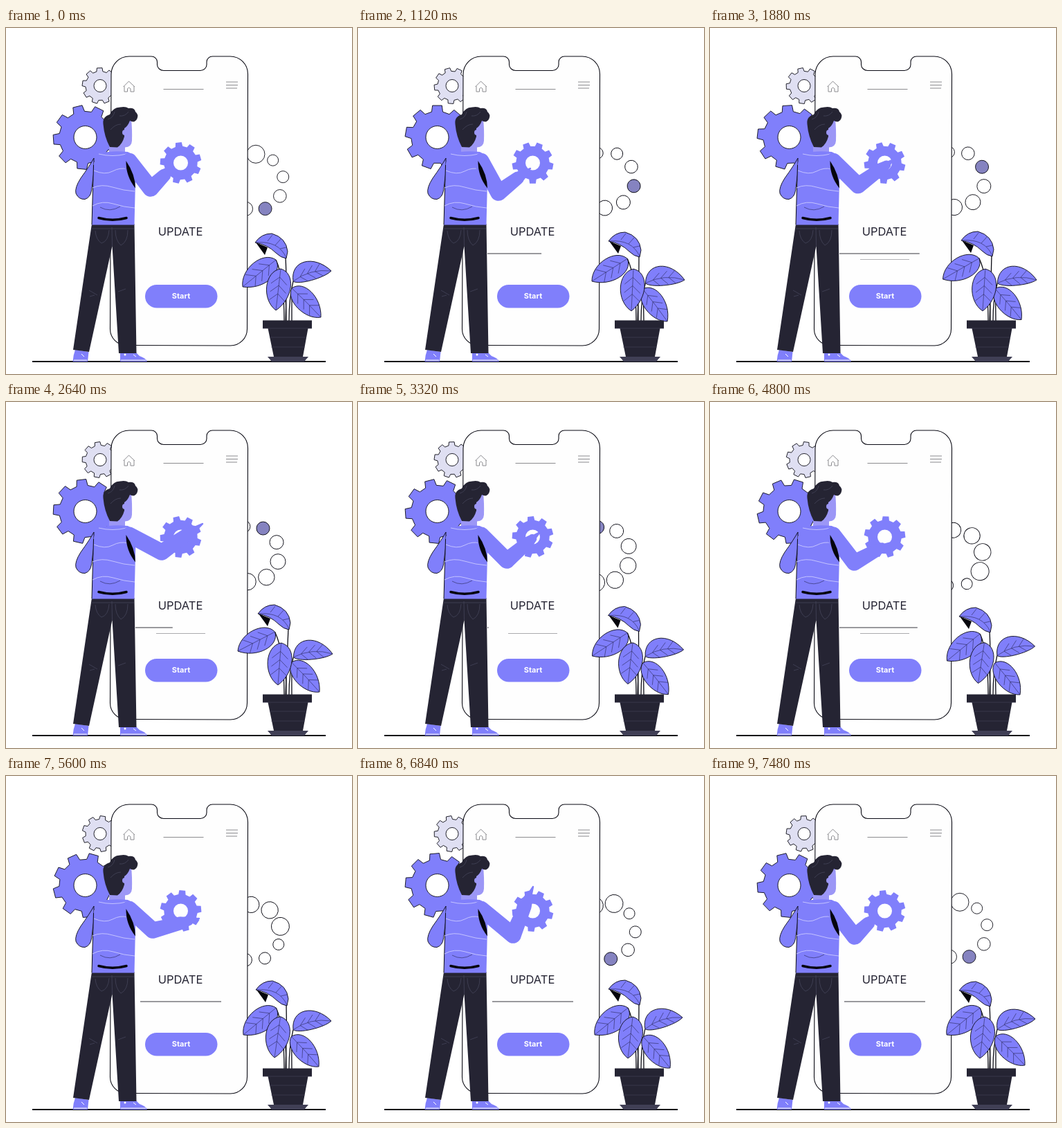
Recreate the animation shown at these times as an HTML page. Size 500x500 px, loop 7720 ms.

```html
<!DOCTYPE html>
<html lang="en">
<head>
<meta charset="utf-8">
<title>Update</title>
<style>
  html, body { margin: 0; width: 100%; height: 100%; overflow: hidden; background: #fff; }
  svg { display: block; width: 100vw; height: 100vh; }
  .main { fill: #807ffb; }
  .dark { fill: #252433; }
  .edge { stroke: #0b0b14; stroke-width: .9; stroke-linejoin: round; }
  .thin { fill: none; stroke: #8b8b8f; stroke-width: 1; }
  .wave { fill: none; stroke: #c4c3ff; stroke-width: 1; }
  .seam { fill: none; stroke: #45445a; stroke-width: .8; }
  .vein { fill: none; stroke: #35346f; stroke-width: .7; }
  .stem { fill: none; stroke: #0b0b14; stroke-width: 1.3; }
  text { font-family: Inter, "Open Sans", sans-serif; text-anchor: middle; }
</style>
</head>
<body>
<svg viewBox="0 0 500 500">
  <g id="ring"></g>
  <path id="gearSmall" class="edge" fill="#dfdff2" fill-rule="evenodd"/>
  <path id="gearBig" class="main edge" fill-rule="evenodd"/>

  <!-- phone -->
  <path fill="#fefefe" stroke="#0b0b14" stroke-width="1.1" d="M178 41H210A8.500 8 0 0 1 218.500 49V53A9.500 8.500 0 0 0 228 61.500H281A9.500 8.500 0 0 0 290 53V49A8.500 8 0 0 1 298.500 41H324A25.500 25.500 0 0 1 349.500 66.500L348.500 435A24 24 0 0 1 324.500 459L174 458.500A23.500 23.500 0 0 1 150.500 435L152 67A26 26 0 0 1 178 41Z"/>
  <path class="thin" d="M169.500 85L177.500 77L186 85M171 84V92H175.500V88Q177.500 84.500 180 88V92H185V84M227.500 88.500H285.500M318 78H335M318 82.500H335M318 87H334"/>
  <text x="252" y="300" font-size="16.5" fill="#252433">UPDATE</text>
  <path id="lineA" class="thin" style="stroke:#77777c;stroke-width:1.3"/>
  <path id="lineB" class="thin" d="M217 334.500H288" style="stroke:#aaaaae"/>
  <rect class="main" x="201" y="371" width="104.500" height="33.500" rx="16.750"/>
  <text x="253" y="391" font-size="11" font-weight="700" fill="#fff">Start</text>

  <path d="M38 482H462" stroke="#0b0b14" stroke-width="2"/>

  <!-- plant -->
  <g id="plant"></g>
  <path fill="#403f55" d="M378 475H437L431 482H384Z"/>
  <path class="dark" d="M371 422.500H442V434H436.500L429 475H387L378.500 434H371Z"/>
  <path fill="none" stroke="#3d3c4e" stroke-width=".8" d="M371 434H442M381 447H434M383.500 461H431.500"/>

  <!-- man -->
  <path class="main edge" d="M127 188Q121 199 108 217Q99 231 101 239Q105 248 114 247.500Q122 245 123.500 235L127 208Z"/>
  <path class="main" d="M100 465L119.500 468L118 482H96.500Q97 473 100 465Z"/>
  <path class="main" d="M165 469H188L193 474Q202 477 204 482H165Z"/>
  <path fill="none" stroke="#fff" stroke-width="1" d="M98 480H117M166 480H202M109 471L113 475M184 472L188 475"/>
  <circle cx="172" cy="472" r="1.500" fill="#fff"/>
  <path class="dark" d="M124 283H185.500L188.500 470H163L153.500 315L120 468L97 465Z"/>
  <path class="seam" d="M129 293Q130 306 138 311Q148 308 149 292M158 292Q158 307 166 314Q176 309 176 292M153 288L153.500 315M120 379L132 386M162 381L173 377M121 388L128 386M124 290H185"/>
  <path fill="#9c97f6" d="M166 132H181Q182.500 146 182 163Q181.500 172 172 172.500V181H149V168Z"/>
  <path class="main" d="M136 181Q152 177 176 179Q188 184 187.500 200L185.500 284.500H124L126.500 202Q127 186 136 181Z"/>
  <path fill="none" stroke="#0b0b14" stroke-width="1" d="M126.500 198L124 284"/>
  <path class="wave" d="M134 182Q154 187 174 182M127 206Q143 213 154 207T176 204M125 231Q138 225 154 230T186 236M125 257Q139 249 155 254T186 260"/>
  <path class="vein" d="M136 259Q150 267 165 258"/>
  <path fill="none" stroke="#05050c" stroke-width="3.500" stroke-linecap="round" d="M134 274.500Q154 280 174 274.500"/>
  <path class="dark" d="M150 172Q142 157 140.500 139Q139 128 150 125Q154 115 165 114.500Q173 113 177 116Q186 115 187 121Q192 125 189.500 131Q186 138 179 134Q176 142 171 145L171 157Q168 168 161 172.500Z"/>
  <path class="seam" d="M147 132Q155 130 157 121M164 127Q172 128 177 121M151 147Q158 139 166 139"/>
  <circle cx="172" cy="151" r="4" fill="#9c97f6"/>

  <path id="gearHand" class="main" fill-rule="evenodd"/>
  <path id="arm" class="main"/>
  <path fill="#05050c" d="M173.500 192Q173 214 187 231.500Q187 212 173.500 192Z"/>
</svg>
<script>
const LOOP = 7720, END = 7480, TAU = Math.PI * 2;
const TIMES = [0, 1120, 2640, 4000, 5600, 6840, END];
const $ = id => document.getElementById(id);
const fix = n => n.toFixed(2);
const ease = u => (1 - Math.cos(u * Math.PI)) / 2;

function add(parent, tag, attrs) {
  const el = document.createElementNS("http://www.w3.org/2000/svg", tag);
  for (const k in attrs) el.setAttribute(k, attrs[k]);
  return parent.appendChild(el);
}

function mix(times, values, t, curve = u => u) {
  let i = 0;
  while (i < times.length - 2 && t >= times[i + 1]) i++;
  const u = curve(Math.min(1, (t - times[i]) / (times[i + 1] - times[i])));
  return values[i] + (values[i + 1] - values[i]) * u;
}

// Poses are listed at TIMES; the last one returns to the first.
function pose(points, t) {
  const all = [...points, points[0]];
  return [0, 1].map(k => mix(TIMES, all.map(p => p[k]), t, ease));
}

function gear(cx, cy, r, hole, turn) {
  const teeth = 9, step = TAU / teeth, pts = [];
  for (let i = 0; i < teeth; i++) {
    for (const [off, k] of [[-.31, .81], [-.21, 1], [.21, 1], [.31, .81]]) {
      const a = turn + (i + off) * step;
      pts.push(fix(cx + r * k * Math.cos(a)) + " " + fix(cy + r * k * Math.sin(a)));
    }
  }
  const arc = `a${hole} ${hole} 0 1 0 `;
  return `M${pts.join("L")}ZM${cx - hole} ${cy}${arc}${2 * hole} 0${arc}${-2 * hole} 0Z`;
}

// A rounded limb between two circles.
function limb([x, y], r, [X, Y], R) {
  const a = Math.atan2(Y - y, X - x), s = Math.sin(a), c = Math.cos(a);
  const p = (px, py, k) => fix(px + s * k) + " " + fix(py - c * k);
  return `M${p(x, y, r)}L${p(X, Y, R)}A${R} ${R} 0 0 1 ${p(X, Y, -R)}L${p(x, y, -r)}A${r} ${r} 0 0 1 ${p(x, y, r)}Z`;
}

// Maps leaf coordinates (u along, v across) to the stage.
function frame([bx, by], [tx, ty]) {
  const dx = tx - bx, dy = ty - by;
  return (u, v) => fix(bx + dx * u - dy * v) + " " + fix(by + dy * u + dx * v);
}

function leafShape(base, tip, w, bend) {
  const p = frame(base, tip);
  return `M${p(0, 0)}C${p(.06, bend - w)} ${p(.68, bend - w)} ${p(1, 0)}C${p(.78, bend + w)} ${p(.1, bend + w)} ${p(0, 0)}Z`;
}

function leafVeins(base, tip, w, bend) {
  const p = frame(base, tip);
  let d = `M${p(0, 0)}Q${p(.5, bend)} ${p(1, 0)}`;
  for (const u of [.2, .4, .6]) {
    const mid = bend * 2 * u * (1 - u);
    for (const side of [-1, 1])
      d += `M${p(u, mid)}L${p(u + .17, mid + side * w * .5)}`;
  }
  return d;
}

const leaves = [
  { base: [390, 335], foot: [402, 423], w: .36, bend: 0,
    tips: [[342, 374], [338, 366], [335, 360], [342, 374], [343, 374], [342, 374]] },
  { base: [415, 366], foot: [409, 423], w: .33, bend: -.2,
    tips: [[470, 351], [472, 364], [472, 364], [469, 352], [470, 354], [469, 349]] },
  { base: [413, 376], foot: [413, 423], w: .34, bend: -.02,
    tips: [[455, 418], [447, 424], [453, 419], [444, 426], [452, 420], [451, 422]] },
  { base: [397, 348], foot: [405, 423], w: .38, bend: 0,
    tips: [[390, 408], [395, 409], [393, 409], [387, 406], [388, 407], [390, 408]] }
];
const plant = $("plant");
const topStem = add(plant, "path", { class: "stem" });
const topLeaf = add(plant, "g", {});
add(topLeaf, "path", { class: "main edge", d: "M360 310Q369 297 384 297Q405 303 407 323L405 333Q397 332 390 325Q378 313 360 310Z" });
add(topLeaf, "path", { class: "vein", d: "M361 310Q394 307 405 332M378 308L385 299M389 314L397 305M396 319L405 317" });
add(topLeaf, "path", { fill: "#05050c", d: "M361 310L378 317L374 328Z" });
for (const leaf of leaves) leaf.stem = add(plant, "path", { class: "stem" });
for (const leaf of leaves) {
  leaf.body = add(plant, "path", { class: "main edge" });
  leaf.veins = add(plant, "path", { class: "vein" });
}
const topSway = [[0, 0], [2, -2], [4, -4], [-1, 1], [1, -1], [2, -2]];

// Loader dots grow around the ring; one is filled.
const ring = $("ring");
[8, 8.5, 9.3, 9.5, 10, 11, 11.7, 12.2, 13].forEach((r, i) => {
  const a = (69.5 + (i - 3) * 40.3) * Math.PI / 180;
  add(ring, "circle", {
    cx: 360.3 + 40.7 * Math.cos(a), cy: 223 + 40.7 * Math.sin(a), r,
    class: "edge", fill: i === 3 ? "#8583c0" : "#fff"
  });
});
const ringTurn = [[0, 6840, END], [0, -346.8, -360]];

const shoulder = [178, 192];
const elbows = [[209, 232], [203, 238], [225, 217], [205, 241], [212, 223], [224, 230]];
const hands = [[242, 200], [249, 203], [284, 176], [241, 201], [279, 206], [253, 160]];
const slide = [[0, 1780, 3300, 4950, END], [187, 311, 187, 311, 311]];

function draw(t) {
  const turn = t / END * TAU;
  $("gearBig").setAttribute("d", gear(114.5, 158, 46.5, 16.5, -1.815 + turn));
  $("gearSmall").setAttribute("d", gear(136, 83.5, 26, 9, -1.6 - turn));
  $("gearHand").setAttribute("d", gear(252.5, 195, 30, 10.5, -1.675 - turn));
  ring.setAttribute("transform", `rotate(${fix(mix(...ringTurn, t))} 356.3 222.5)`);

  const right = mix(...slide, t);
  $("lineA").setAttribute("d", `M${fix(Math.max(187, right - 117))} 326H${fix(right)}`);
  $("lineB").style.opacity = mix([0, 1700, 1900, 4850, 5050, END], [0, 0, 1, 1, 0, 0], t);

  const elbow = pose(elbows, t), tip = pose(hands, t);
  const along = k => elbow.map((e, i) => e + (tip[i] - e) * k);
  const wrist = along(.6);
  $("arm").setAttribute("d", limb(shoulder, 11.5, elbow, 11.8)
    + limb(elbow, 11.8, wrist, 9.5) + limb(wrist, 9.5, along(.78), 6.5) + limb(along(.75), 5, tip, 1.2));

  const [sx, sy] = pose(topSway, t);
  topLeaf.setAttribute("transform", `translate(${fix(sx)} ${fix(sy)})`);
  topStem.setAttribute("d", `M404 423Q406 370 ${fix(404 + sx)} ${fix(331 + sy)}`);
  for (const { base, foot, w, bend, tips, stem, body, veins } of leaves) {
    const end = pose(tips, t);
    const root = base.map((b, i) => b + (end[i] - tips[0][i]) * .2);
    stem.setAttribute("d", `M${foot.join(" ")}Q${foot[0]} ${base[1] + 25} ${fix(root[0])} ${fix(root[1])}`);
    body.setAttribute("d", leafShape(root, end, w, bend));
    veins.setAttribute("d", leafVeins(root, end, w, bend));
  }
}

function tick() {
  draw(Math.min(performance.now() % LOOP, END));
  requestAnimationFrame(tick);
}
tick();
</script>
</body>
</html>
```
